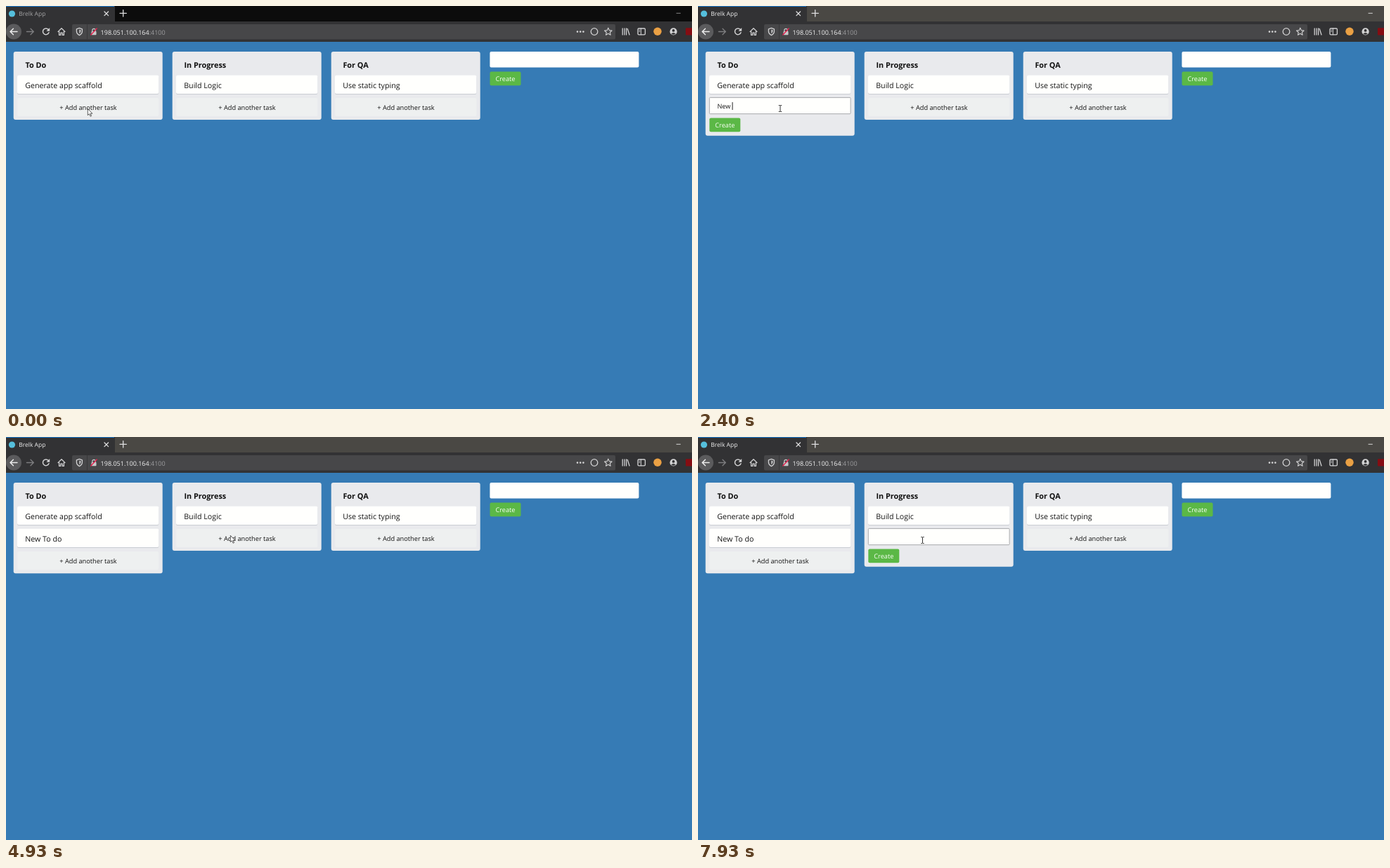
An HTML page for the animation above (8 s loop, 976x574 px).

```html
<!DOCTYPE html>
<html lang="en">
<head>
<meta charset="utf-8">
<title>Task board</title>
<style>
  html, body { margin: 0; width: 100%; height: 100%; overflow: hidden; background: #367bb5; }
  svg { display: block; width: 976px; height: 574px; }
  text { font-family: "Open Sans", "Noto Sans", sans-serif; white-space: pre; text-rendering: geometricPrecision; }
  .line { fill: none; stroke: #d2d2d3; stroke-width: 1.3; stroke-linecap: round; stroke-linejoin: round; }
</style>
</head>
<body>
<svg viewBox="0 0 976 574" xmlns="http://www.w3.org/2000/svg">
  <g id="bar"></g>
  <g id="tools"></g>
  <g id="board"></g>
  <rect id="caret" y="137" width="1" height="11" fill="#222"/>
  <g id="pointer"></g>
</svg>
<script>
const LOOP = 8000;
const el = id => document.getElementById(id);

const rect = (x, y, w, h, fill, r = 0, more = '') =>
  `<rect x="${x}" y="${y}" width="${w}" height="${h}" rx="${r}" fill="${fill}" ${more}/>`;
const text = (x, y, size, str, fill = '#141414', more = '') =>
  `<text x="${x}" y="${y}" font-size="${size}" fill="${fill}" ${more}>${str}</text>`;
const circle = (x, y, r, fill) => `<circle cx="${x}" cy="${y}" r="${r}" fill="${fill}"/>`;
const line = (d, more = '') => `<path class="line" d="${d}" ${more}/>`;
const MID = 'text-anchor="middle"';

// Browser window
function drawBar(active) {
  const ink = active ? '#f0f0f0' : '#a5a5a6';
  return rect(0, 0, 976, 22, active ? '#4a4844' : '#0c0c0c') +
    rect(0, 0, 155, 22, '#323234') +
    rect(0, 0, 154, 1, '#1976c8') +
    circle(8.5, 11, 4.6, '#55bfdc') +
    text(18.2, 14.2, 8.5, 'Brelk App', ink) +
    line('M140 8l5.6 5.6M145.6 8l-5.6 5.6', 'style="stroke:#dededf"') +
    line('M162 10.3h9.4M166.7 5.6v9.4', 'style="stroke:#dededf"') +
    line('M954 10.3h5.4', `style="stroke:${active ? '#d8d8d8' : '#858585'};stroke-width:1"`);
}

function drawTools() {
  const star = Array.from({ length: 10 }, (_, i) => {
    const a = i * Math.PI / 5 - Math.PI / 2, r = i % 2 ? 2.6 : 5.6;
    return `${(856.8 + r * Math.cos(a)).toFixed(1)} ${(36.7 + r * Math.sin(a)).toFixed(1)}`;
  }).join('L');
  return rect(0, 22, 976, 29, '#323234') +
    rect(94, 26, 773, 21.5, '#474749', 2) +
    rect(115, 26, 1, 21.5, '#38383a') +
    circle(11, 36.5, 11, '#5b5b5d') +
    line('M16 36.5H6.3M10.4 32.2L6.1 36.5l4.3 4.3', 'style="stroke:#ececec;stroke-width:1.5"') +
    line('M29.4 36.5h9.7M35 32.2l4.3 4.3-4.3 4.3', 'style="stroke:#7d7d7f"') +
    line('M60.2 33.4A4.4 4.4 0 1 0 61 37.8', 'style="stroke-width:1.5"') +
    '<path d="M62.2 31v4.8h-4.8z" fill="#d2d2d3"/>' +
    line('M74 36.6l5-4.8 5 4.8M75.6 36.4v5h2.2v-3.2h2.4v3.2h2.2v-5') +
    line('M104.4 31.4l4 1.4v3.2q0 3.6-4 5.6q-4-2-4-5.6v-3.2z') +
    '<path d="M104.4 33.6v5.6q2-1.4 2-3.4v-1.5z" fill="#d2d2d3"/>' +
    rect(121.5, 36, 7, 5.2, '#c9c9ca', 1) +
    line('M122.8 36v-1.4a2.2 2.2 0 0 1 4.4 0V36', 'style="stroke:#c9c9ca"') +
    line('M120.8 41L129.2 32', 'style="stroke:#e3224f;stroke-width:1.5"') +
    text(134.6, 40.5, 9.02, '198.051.100.164<tspan fill="#9c9c9e">:4100</tspan>', '#f2f2f2') +
    [813, 817.2, 821.4].map(x => circle(x, 36.6, 1.3, '#d2d2d3')).join('') +
    '<circle class="line" cx="837" cy="36.5" r="4.8"/>' +
    line(`M${star}Z`, 'style="stroke-width:1.1"') +
    line('M877.2 32v9M880 32v9M882.6 32v9M884.2 32.4l2.8 8.6') +
    '<rect class="line" x="899" y="32" width="10.4" height="8.8" rx="1.4"/>' +
    line('M903.4 32v8.8M900.8 34.4h1M900.8 36.4h1', 'style="stroke-width:1"') +
    circle(927, 36.3, 5.7, '#eaa044') +
    circle(949.6, 36.4, 5.1, '#d2d2d3') +
    circle(949.6, 34.9, 1.9, '#323234') +
    '<path d="M946.4 39.4q3.2-3 6.4 0q-3.2 2.6-6.4 0z" fill="#323234"/>' +
    rect(967, 31.2, 10, 10.4, '#850d12', 1);
}

// Task lists
const lists = [
  { x: 11, title: 'To Do', task: 'Generate app scaffold' },
  { x: 237, title: 'In Progress', task: 'Build Logic' },
  { x: 463, title: 'For QA', task: 'Use static typing' }
];

const createButton = (x, y) =>
  rect(x, y, 44, 19.7, '#5bb846', 2) + text(x + 22, y + 13.6, 9.2, 'Create', '#f8fff5', MID);

const card = (x, y, str) =>
  rect(x + 5, y + 1, 201.3, 26.2, '#c9ccd3', 2) +
  rect(x + 5, y, 201.3, 26.2, '#fffffd', 2) +
  text(x + 16.2, y + 18.4, 10.66, str);

function drawList({ x, title, task }, tasks, field) {
  const end = 98.7 + tasks.length * 32.1;
  const bottom = field === null ? end + 31.3 : end + 54;
  let out = rect(x - 0.3, 65, 212, bottom - 65, '#e9eaed', 3) +
    text(x + 16.4, 87.8, 10.85, title, '#111', 'font-weight="700"');
  tasks.forEach((str, i) => { out += card(x, 98.7 + i * 32.1, str); });
  if (field === null) {
    return out + rect(x + 5.3, end + 0.2, 201, 26, '#eef0f0', 2) +
      text(x + 106, end + 16.8, 9.23, '+ Add another task', '#141414', MID);
  }
  return out +
    rect(x + 5.3, 130.4, 200.8, 23.2, '#fffffd', 1, 'stroke="#a9abae"') +
    text(x + 16.4, 146, 9.1, field, '#141414', 'id="entry"') +
    createButton(x + 5.3, 159.5);
}

function drawBoard(added, column, entry) {
  return rect(0, 51, 976, 523, '#367bb5') +
    lists.map((list, i) => {
      const tasks = i === 0 && added ? [list.task, 'New To do'] : [list.task];
      return drawList(list, tasks, i === column ? entry : null);
    }).join('') +
    rect(688.4, 65, 212, 22.6, '#fffffd', 2) +
    createButton(688.5, 93.5);
}

// Time, open column, typed text, caret shown
const typing = [
  [0, -1, '', 0],
  [400, 0, '', 1], [1000, 0, '', 0], [1530, 0, '', 1],
  [1800, 0, 'N', 1], [2000, 0, 'Ne', 1], [2200, 0, 'New', 1], [2400, 0, 'New ', 1],
  [2600, 0, 'New T', 1], [2800, 0, 'New To', 1], [2930, 0, 'New To ', 1],
  [3000, 0, 'New To d', 1], [3200, 0, 'New To do', 1],
  [3400, -1, '', 0],
  [5200, 1, '', 1], [5730, 1, '', 0], [6330, 1, '', 1],
  [6530, 1, 'd', 1], [6730, 1, 'do', 1], [6930, 1, 'do', 0],
  [7200, 1, 'd', 1], [7400, 1, '', 1], [7930, 1, '', 0]
];

// Time, pointer shape, hot spot
const moves = [
  [0, 'arrow', 116, 146], [400, 'beam', 117, 146], [3400, 'hand', 117, 146],
  [3800, 'hand', 120, 149], [4000, 'hand', 158, 149], [4130, 'hand', 184, 146],
  [4200, 'hand', 194, 143], [4330, 'arrow', 220, 140], [4400, 'arrow', 242, 138],
  [4530, 'arrow', 276, 136], [4600, 'arrow', 296, 136], [4800, 'arrow', 313, 138],
  [4930, 'arrow', 319, 140], [5000, 'arrow', 321, 142], [5200, 'beam', 321, 142],
  [5400, 'beam', 320.5, 144], [5600, 'beam', 320, 146], [5800, 'beam', 319.5, 147]
];

const shapes = {
  arrow: '<path d="M.3 .3V9.6L2.5 7.7 4.1 11.2 5.6 10.5 4 7.2H6.9Z" fill="#fff" stroke="#333" stroke-width=".8"/>',
  beam: '<path d="M-2.2-4.5H-.6L0-4 .6-4.5H2.2M-2.2 4.5H-.6L0 4 .6 4.5H2.2M0-4V4" fill="none" stroke="#333" stroke-width="1"/>',
  hand: '<path d="M-.9 1Q0-.4 .9 1V4.5L2.4 4.8 4 5.2 5.6 6V9.2L4.6 12.6H-.4L-3.2 8.4Q-3.5 6.8-2.2 7L-.9 8.2Z" fill="#fff" stroke="#222" stroke-width=".9" stroke-linejoin="round"/>'
};

const at = (table, t) => table.findLast(row => row[0] <= t);
const start = performance.now();
let last = '';

function render(now) {
  const t = Math.max(0, now - start) % LOOP;
  const [, column, entry, caret] = at(typing, t);
  const [, shape, x, y] = at(moves, t);
  const active = t >= 330, added = t >= 3400;
  const key = [active, added, column, entry, caret, shape, x, y].join();
  if (key !== last) {
    last = key;
    el('bar').innerHTML = drawBar(active);
    el('board').innerHTML = drawBoard(added, column, entry);
    el('pointer').innerHTML = shapes[shape];
    el('pointer').setAttribute('transform', `translate(${x} ${y})`);
    el('caret').setAttribute('visibility', caret ? 'visible' : 'hidden');
    if (caret) {
      const width = entry ? el('entry').getComputedTextLength() : 0;
      el('caret').setAttribute('x', lists[column].x + 16.3 + width);
    }
  }
  requestAnimationFrame(render);
}

el('tools').innerHTML = drawTools();
render(start);
</script>
</body>
</html>
```
